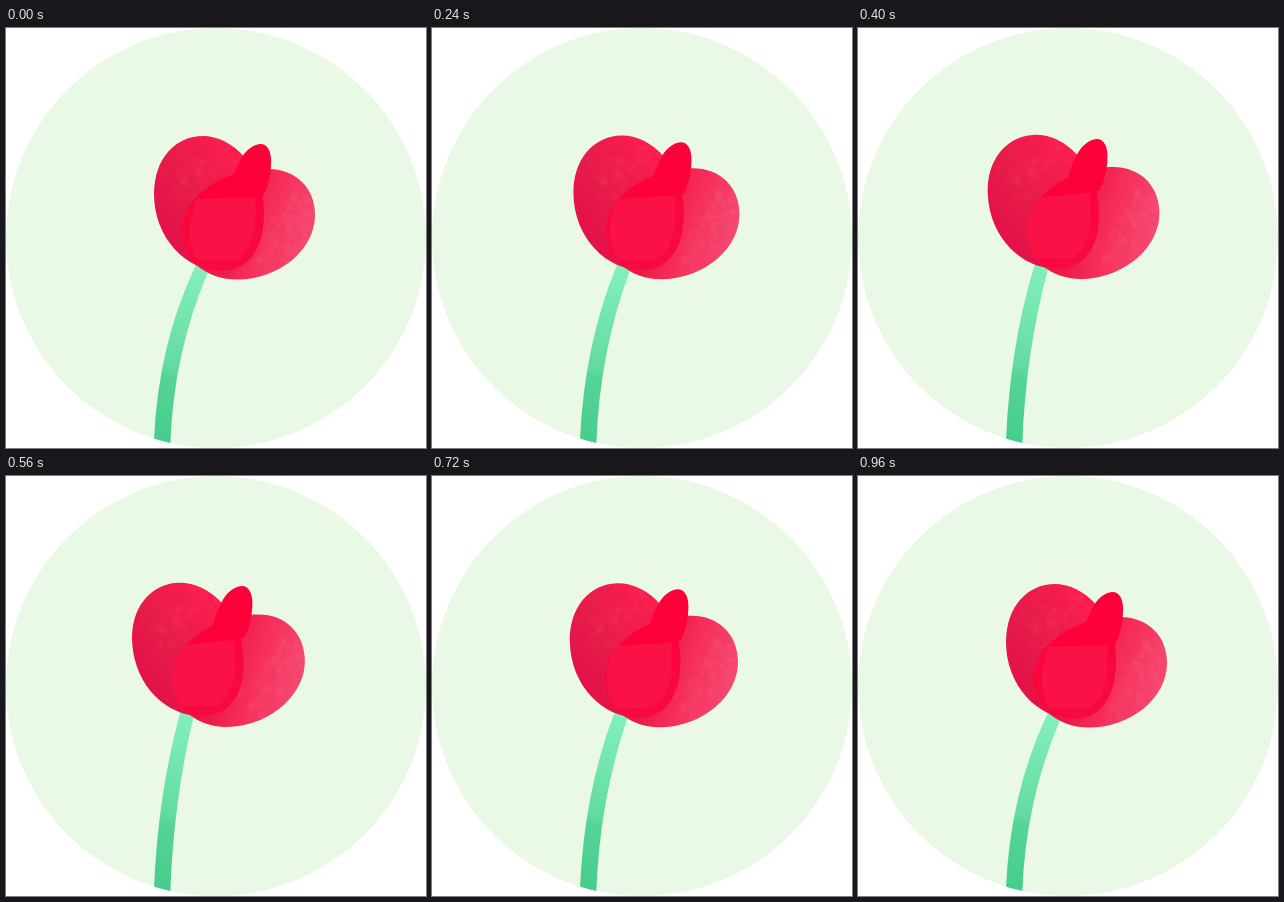
An HTML page for the animation above (1000 ms loop, 420 by 420 pixels).

```html
<!DOCTYPE html>
<html lang="en">
<head>
<meta charset="utf-8">
<title>Swaying flower</title>
<style>
  html, body { margin: 0; width: 100%; height: 100%; overflow: hidden; background: #fff; }
  svg { display: block; width: 100vw; height: 100vh; }
</style>
</head>
<body>
<svg viewBox="0 0 420 420">
  <defs>
    <path id="leftShape" d="M148 166C148 130 170 108 197 108C226 108 258 138 258 185C258 220 243 243 216 243C180 243 148 210 148 166Z"/>
    <path id="rightShape" d="M309 187C309 222 273 251.500 231 251.500C197 251.500 175 228 175 204C175 170 215 141 262 141C290 141 309 160 309 187Z"/>
    <clipPath id="disc"><circle cx="210" cy="210" r="210"/></clipPath>
    <clipPath id="leftClip"><use href="#leftShape"/></clipPath>
    <clipPath id="rightClip"><use href="#rightShape"/></clipPath>
    <clipPath id="overlap"><use href="#rightShape" class="right"/></clipPath>
    <linearGradient id="leftFill" gradientUnits="userSpaceOnUse" x1="150" y1="190" x2="228" y2="135">
      <stop offset="0" stop-color="#e31248"/>
      <stop offset=".45" stop-color="#e71c4a"/>
      <stop offset="1" stop-color="#f81c4c"/>
    </linearGradient>
    <linearGradient id="rightFill" gradientUnits="userSpaceOnUse" x1="225" y1="190" x2="300" y2="215">
      <stop offset="0" stop-color="#ec1848"/>
      <stop offset=".4" stop-color="#f52c58"/>
      <stop offset="1" stop-color="#f4486f"/>
    </linearGradient>
    <linearGradient id="overlapFill" gradientUnits="userSpaceOnUse" x1="0" y1="140" x2="0" y2="244">
      <stop offset=".27" stop-color="#fd0138"/>
      <stop offset=".35" stop-color="#f9063d"/>
      <stop offset="1" stop-color="#f60a40"/>
    </linearGradient>
    <linearGradient id="stemFill" gradientUnits="userSpaceOnUse" x1="192" y1="240" x2="156" y2="412">
      <stop offset="0" stop-color="#82efba"/>
      <stop offset=".35" stop-color="#70e4ab"/>
      <stop offset=".6" stop-color="#62da9f"/>
      <stop offset=".64" stop-color="#55d495"/>
      <stop offset="1" stop-color="#46cd8c"/>
    </linearGradient>
  </defs>
  <g clip-path="url(#disc)">
    <rect width="420" height="420" fill="#eaf9e6"/>
    <path id="stem" fill="url(#stemFill)"/>
    <g class="left">
      <use href="#leftShape" fill="url(#leftFill)"/>
      <g id="leftGrain" clip-path="url(#leftClip)" fill="#ff4a6c"/>
    </g>
    <g class="right">
      <use href="#rightShape" fill="url(#rightFill)"/>
      <g id="rightGrain" clip-path="url(#rightClip)" fill="#ff6c8e"/>
    </g>
    <g clip-path="url(#overlap)">
      <g class="left">
        <use href="#leftShape" fill="url(#overlapFill)"/>
        <path d="M190 171L250 169L249 200Q243 228 228 233L192 232Q182 220 184 195Z" fill="#fa1146"/>
      </g>
    </g>
    <path class="small" fill="#fd0138" d="M254 116C262 115 266 125 265 137C264 152 261 161 257 168L222 169C224 157 229 142 236 129C241 121 247 117 254 116Z"/>
  </g>
</svg>
<script>
const LOOP = 1000, STEP = 40;
// [time, amount]
const sway = [[0, 0], [240, .3], [400, .835], [510, 1.05], [560, 1], [720, .465], [800, .18], [960, 0], [1000, 0]];
const open = [[0, 0], [240, .08], [400, .77], [510, 1.14], [560, 1.1], [720, .23], [800, -.1], [960, 0], [1000, 0]];

const slope = (a, b) => (b[1] - a[1]) / (b[0] - a[0]);

function tangent(keys, i) {
  if (i === 0 || i === keys.length - 1) return 0;
  const before = slope(keys[i - 1], keys[i]), after = slope(keys[i], keys[i + 1]);
  return before * after <= 0 ? 0 : 2 * before * after / (before + after);
}

// Monotone cubic interpolation
function valueAt(keys, t) {
  let i = 0;
  while (i < keys.length - 2 && t >= keys[i + 1][0]) i++;
  const [t0, v0] = keys[i], [t1, v1] = keys[i + 1];
  const h = t1 - t0, u = (t - t0) / h, w = 1 - u;
  return v0 * (1 + 2 * u) * w * w + v1 * u * u * (3 - 2 * u)
    + h * u * w * (w * tangent(keys, i) - u * tangent(keys, i + 1));
}

let seed = 11;
const rand = () => (seed = seed * 16807 % 2147483647) / 2147483647;

// Watercolour flecks scattered along a slanted band
function grain(id, x, y, length, width, angle, count) {
  const group = document.getElementById(id);
  const c = Math.cos(angle), s = Math.sin(angle);
  for (let i = 0; i < count; i++) {
    const a = (rand() - .5) * length, b = (rand() + rand() - 1) * width;
    const dot = document.createElementNS("http://www.w3.org/2000/svg", "circle");
    dot.setAttribute("cx", (x + a * c - b * s).toFixed(1));
    dot.setAttribute("cy", (y + a * s + b * c).toFixed(1));
    dot.setAttribute("r", (1 + rand() * 4).toFixed(1));
    dot.setAttribute("opacity", .07);
    group.append(dot);
  }
}
grain("leftGrain", 202, 142, 75, 22, -.55, 70);
grain("rightGrain", 276, 205, 85, 22, -.9, 80);

const parts = name => document.querySelectorAll("." + name);
const left = parts("left"), right = parts("right"), small = parts("small");
const stem = document.getElementById("stem");

const pose = (nodes, x, y, turn = 0) => nodes.forEach(n =>
  n.setAttribute("transform", `translate(${x} ${y}) rotate(${turn} 200 243)`));

function draw(t) {
  const s = valueAt(sway, t), o = valueAt(open, t);
  pose(left, -16.5 * s, -1.8 * s, -4 * s);
  pose(right, -6 * o, 1.2 * s, -3.5 * s);
  pose(small, -18.7 * s, -6 * s);
  const dx = -14.5 * s, dy = -3 * s;
  stem.setAttribute("d", `M147 420L148 412Q152 318 ${188.5 + dx} ${240 + dy}`
    + `L${192 + dx} ${232 + dy}L${207 + dx} ${234 + dy}L${202 + dx} ${244 + dy}Q167.5 325 164.3 416V420Z`);
}

function frame(now) {
  draw(Math.floor(now % LOOP / STEP) * STEP);
  requestAnimationFrame(frame);
}
draw(0);
requestAnimationFrame(frame);
</script>
</body>
</html>
```
